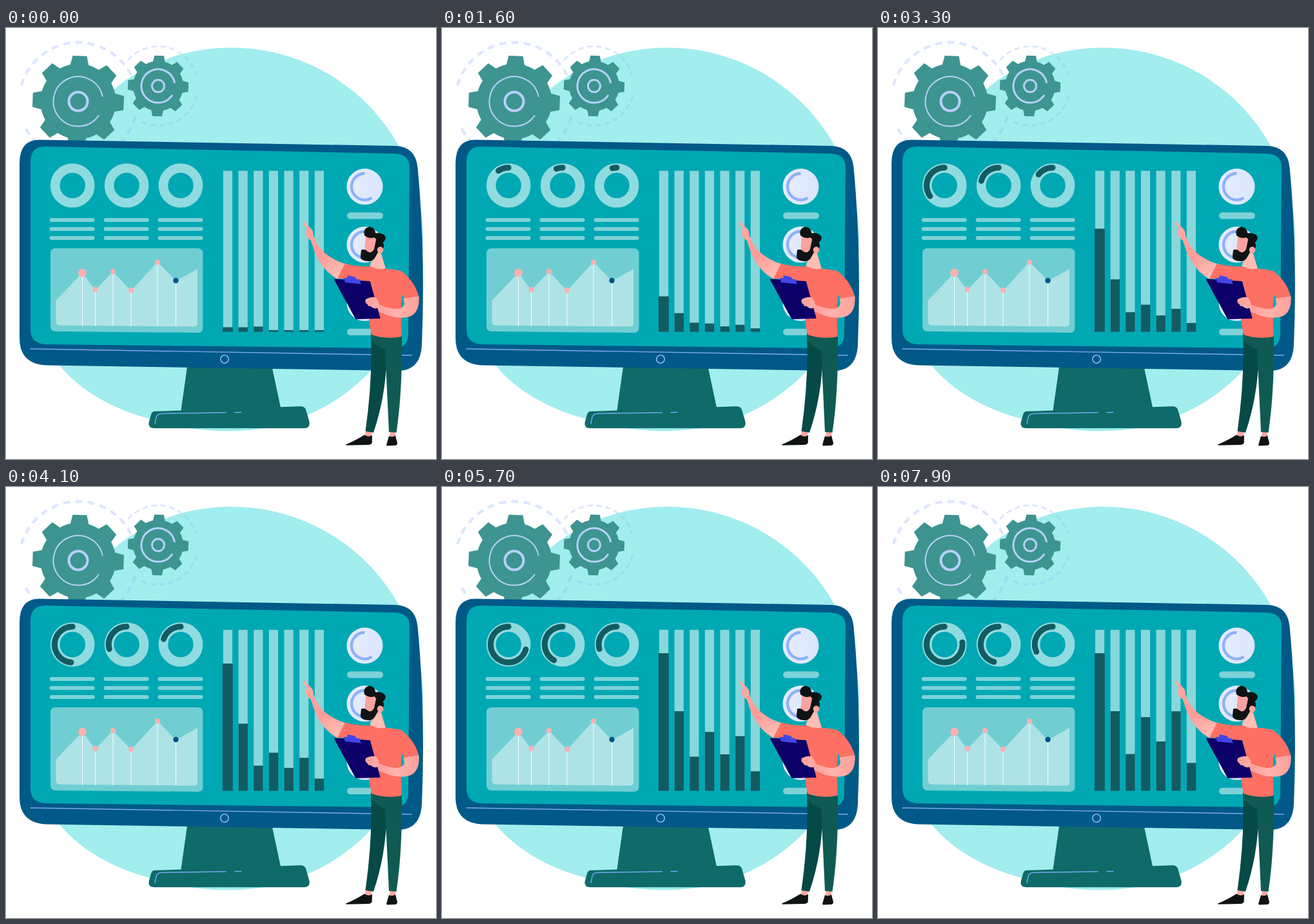
An HTML page for the animation above (8000 ms loop, 667 by 669 pixels).

```html
<!DOCTYPE html>
<html lang="en">
<head>
<meta charset="utf-8">
<title>Dashboard presentation</title>
<style>
html, body { margin: 0; width: 100%; height: 100%; overflow: hidden; background: #fff; }
svg { display: block; width: 100%; height: 100%; }
.line { fill: none; stroke-linecap: round; }
</style>
</head>
<body>
<svg viewBox="0 0 667 669">
  <defs>
    <linearGradient id="reach" gradientUnits="userSpaceOnUse" x1="462" y1="305" x2="522" y2="385">
      <stop offset="0" stop-color="#ffa9a4"/><stop offset=".55" stop-color="#fc9c98"/><stop offset="1" stop-color="#ffc0b8"/>
    </linearGradient>
    <linearGradient id="bent" gradientUnits="userSpaceOnUse" x1="575" y1="430" x2="641" y2="430">
      <stop offset="0" stop-color="#fc9c98"/><stop offset=".45" stop-color="#ffb3ad"/><stop offset="1" stop-color="#fda09b"/>
    </linearGradient>
    <linearGradient id="disc">
      <stop offset="0" stop-color="#e6edfe"/><stop offset="1" stop-color="#dbe5fd"/>
    </linearGradient>
  </defs>

  <path fill="#a2edee" d="M350 30.5A297 297 0 0 1 349 625.5C300 625.5 262 619 225 607C165 592 115 562 84 525L60 420L70 230C85 190 120 140 162 100C215 52 285 30.5 350 30.5Z"/>
  <g id="gears"></g>

  <!-- monitor -->
  <path fill="#0f6a6a" d="M281 526L413 528L426 589L271 597ZM231 595L456 587.3Q463 587 465 592L470.5 611Q472 621 463 621.3H230Q220 621 221.7 612L225 600Q226.500 595 231 595Z"/>
  <path class="line" stroke="#70a9ec" stroke-width="1.5" d="M231 614L233 604Q235 598.700 241 598.500L341 597M355 596.700L365 596.500"/>
  <path fill="#005987" d="M21 210Q21 173.500 52 173.500L604 183Q635 184 638.500 216Q651 350 645 492Q643 532 608 532L62 523.500Q21 521 21 482Z"/>
  <path fill="#00a8b3" d="M38 208Q38 184 60 184L603 195Q626 196 626 216L624 478Q622 497.500 601 497L62 491Q38 490 38 468Z"/>
  <path class="line" stroke="#7fa9f0" stroke-width="1.4" d="M38 498L629 508"/>
  <circle class="line" cx="339" cy="514" r="6.200" stroke="#8fb8fa" stroke-width="1.600"/>

  <!-- line chart -->
  <path fill="#70ced3" d="M69 350Q69 342 77 342H297Q305.500 342 305.500 350V465Q305.500 473 297 473L77 471Q69 471 69 463Z"/>
  <path fill="#aee3e6" d="M77.500 423L118.500 380L138.500 407L166 378L194 408L235 363L263.500 393L297 374V458Q297 463.500 291 463.500L83 461.500Q77.500 461 77.500 455Z"/>
  <g id="chart"></g>
  <g id="panels"></g>

  <!-- presenter -->
  <path fill="#fca5a0" d="M558.500 622L567.500 624L566.500 635H556.500ZM596 624L603.500 626L604 637H595Z"/>
  <path fill="#101313" d="M527 646.500Q541 641 556 631.500Q562 636 568 632L567.700 644Q566 647 562 647L528 647.700ZM590 647L594 633.500Q600 636 604 632.500L607 644Q607 648 603 648L591 648.500Z"/>
  <path fill="#064a47" d="M566 474Q569 545 557.500 626L570 628Q590 570 591 500L588 480Z"/>
  <path fill="#0f5a53" d="M566 473L567 485Q572 492 588 500Q591 560 594 627L605.500 628Q615 565 614 478Z"/>
  <path fill="#ffbdb4" d="M565 366L580 343L589 374Q578 380 565 373Z"/>
  <path fill="url(#reach)" d="M526 366Q500 358 486 340Q480 331 477 322Q477 315 473 311Q468 307 463.500 301Q459.500 299.500 461 304L467 312Q462 317 466 323Q469 328 473 330Q480 355 490 368Q500 382 515 390Z"/>
  <path fill="#ff7064" d="M526 365.500Q545 371 566 370Q577 376 589 373.500Q600 374 613 377Q634 393 640 416L617 421Q616 412 614 416L612.500 440L613.500 479Q590 484 567 476Q562 455 563 430L566 395Q545 390 514 389Z"/>
  <path fill="url(#bent)" d="M616.500 420L640.500 416Q642 438 630 446Q618 453 595 447L575 439L578 429Q597 437 608 436Q617 434 618 428Z"/>
  <path fill="#0c0068" stroke="#0c0068" stroke-linejoin="round" stroke-width="2" d="M510 390.500L564 394L579.500 450L543 451Z"/>
  <path fill="#4245e6" d="M524 388L529.500 388V384L541.500 386.500L543 389.500L548.500 390.500L550.500 397.500L526 395Z"/>
  <path fill="#fda9a4" d="M558 421Q566 416.500 573 418Q580 424 579 434Q570 437 566 432Q560 432 561 429Q556 427 558 421Z"/>
  <path class="line" stroke="#e97f80" stroke-width=".8" d="M559 425.500L567 424M562 430L569 427"/>
  <path fill="#fba39f" d="M558 324L577 321L581 342L571 354L556 347Z"/>
  <path fill="#101313" d="M551 344.500Q556 342 561 347Q567 351 571 343L574 329L582 332L580 343L572 357Q568 363 562 362Q549 361 550 354Z"/>
  <path fill="#101313" d="M556 322Q553 311 564 308.500Q573 310 573 318.500Q586 317 589 325Q588 331 584.500 333Q589 340 582 344L576 346L574 334Q576 328 571 325Q564 328 556 322Z"/>
  <ellipse cx="580.500" cy="344.500" rx="4.800" ry="5" fill="#fca5a0"/>
</svg>

<script>
const LOOP = 8000, STEP = 100, RING_TIME = 7000, FLOOR = 471.5;
const el = id => document.getElementById(id);

function add(parent, tag, attrs) {
  const node = document.createElementNS("http://www.w3.org/2000/svg", tag);
  for (const key in attrs) node.setAttribute(key, attrs[key]);
  parent.appendChild(node);
  return node;
}

function polar(cx, cy, r, deg) {
  const a = deg * Math.PI / 180;
  return (cx + r * Math.cos(a)).toFixed(2) + " " + (cy + r * Math.sin(a)).toFixed(2);
}

// clockwise arc, in degrees from the right
const arc = (cx, cy, r, from, to) =>
  `M${polar(cx, cy, r, from)}A${r} ${r} 0 ${to - from > 180 ? 1 : 0} 1 ${polar(cx, cy, r, to)}`;

const stroke = (parent, d, color, width, extra) =>
  add(parent, "path", { class: "line", d, stroke: color, "stroke-width": width, ...extra });

function gear(cx, cy, body, tip, inner, innerWidth, hub, hubWidth) {
  const g = el("gears");
  const teeth = Array.from({ length: 8 }, (_, i) => {
    const a = i * 45 + 2;
    const pt = (r, off) => polar(cx, cy, r, a + off);
    return `M${cx} ${cy}L${pt(body - 1, -14.5)}L${pt(tip, -8.8)}L${pt(tip, 8.8)}L${pt(body - 1, 14.5)}Z`;
  });
  add(g, "circle", { cx, cy, r: body, fill: "#3d9490" });
  add(g, "path", { d: teeth.join(""), fill: "#3d9490" });
  stroke(g, arc(cx, cy, inner, 35, 348), "#b8d0fa", innerWidth);
  add(g, "circle", { class: "line", cx, cy, r: hub, stroke: "#b8d0fa", "stroke-width": hubWidth });
}

function dashes(cx, cy, r, width, pattern, spans) {
  for (const [from, to] of spans)
    stroke(el("gears"), arc(cx, cy, r, from, to), "#8fb0f8", width,
      { "stroke-dasharray": pattern, "stroke-opacity": .3 });
}

dashes(112, 114, 91.5, 4.5, "7 12", [[197, 333], [16, 154]]);
dashes(236, 90, 61.5, 3, "6 8", [[222, 341], [16, 119]]);
gear(112, 114, 58.5, 71.5, 38.5, 2, 14.5, 4);
gear(236, 90, 39, 47.5, 26, 3, 9.5, 3);

const points = [[118.5, 380, 6.5], [138.5, 406, 4.2], [166, 378, 4.2], [194, 407, 4.2], [235, 363.5, 4.2], [263.5, 392, 4.2]];
points.forEach(([cx, cy, r], i) => {
  stroke(el("chart"), `M${cx} ${cy}V462.5`, "#f4fcfc", 1.1);
  add(el("chart"), "circle", { cx, cy, r, fill: i < 5 ? "#fbb1af" : "#00548a" });
});

const panels = el("panels");
const pill = (x, y, width, height) =>
  add(panels, "rect", { x, y, width, height, rx: height / 2, fill: "#7dd2d7" });

// final sweep of each ring, counter-clockwise
const rings = [277, 165, 114].map((sweep, i) => {
  const cx = 103.2 + i * 83.9, cy = 244.5;
  add(panels, "circle", { class: "line", cx, cy, r: 27, stroke: "#90dbe0", "stroke-width": 14.6 });
  for (let row = 0; row < 3; row++) pill(67.6 + i * 84, 295 + row * 14, 70, 6);
  return { cx, cy, sweep, node: stroke(panels, "", "#125b61", 9) };
});

// start height, growth, duration
const bars = [
  [7, 206.5, 5000], [7, 116.5, 5600], [8, 49, 7000], [2.5, 112, 8150],
  [2.5, 76.8, 9000], [2.5, 135, 10000], [2.5, 45.5, 10000]
].map(([start, grow, time], i) => {
  const x = 336.9 + i * 23.65;
  add(panels, "rect", { x, y: 221.7, width: 14.2, height: 249, fill: "#88d7db" });
  const wide = i ? 0 : 1;
  const node = add(panels, "rect", { x: x - wide, width: 14.4 + wide * 1.5, fill: "#125b61" });
  return { start, grow, time, node };
});

for (const cy of [246.3, 336.3, 426.8]) {
  add(panels, "circle", { cx: 556.5, cy, r: 28, fill: "url(#disc)" });
  stroke(panels, arc(556.5, cy, 20.5, 58, 270), "#8fb0f8", 4.4, { style: "stroke-linecap:butt" });
  pill(529, cy + 40, 56, 10.3);
}

const ease = x => (1 - Math.cos(Math.PI * Math.min(x, 1))) / 2;

function draw(t) {
  const turn = ease(t / RING_TIME);
  for (const { cx, cy, sweep, node } of rings)
    node.setAttribute("d", t ? arc(cx, cy, 27.8, -90 - sweep * turn, -90) : "");
  for (const { start, grow, time, node } of bars) {
    const h = start + grow * ease(t / time);
    node.setAttribute("y", FLOOR - h);
    node.setAttribute("height", h);
  }
}

const begin = performance.now();
function frame() {
  const t = (performance.now() - begin) % LOOP;
  draw(Math.floor(t / STEP) * STEP);
  requestAnimationFrame(frame);
}
frame();
</script>
</body>
</html>
```
